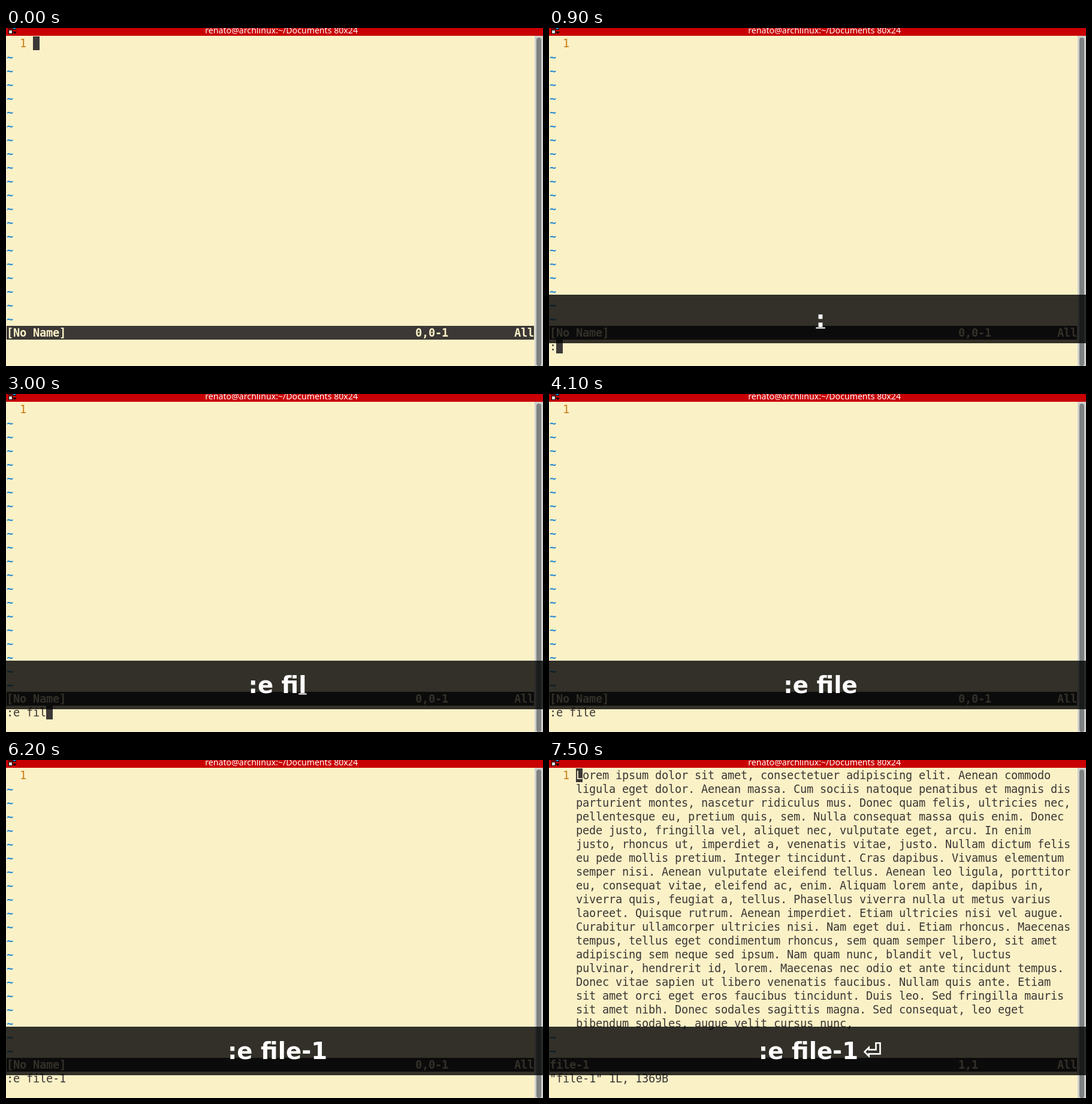
Animation of 896x564 px, one loop 8000 ms. Source, as an HTML page:

```html
<!DOCTYPE html>
<html lang="en">
<head>
<meta charset="utf-8">
<title>Opening a file</title>
<style>
html, body { margin: 0; width: 100%; height: 100%; overflow: hidden; background: #fbf1c7; }
svg { display: block; width: 100vw; height: 100vh; }
.cell { font: 18.667px "DejaVu Sans Mono", monospace; fill: #3c3836; }
.bold { font-weight: bold; }
.status { fill: #fbf1c7; }
.number { fill: #c77d16; }
.tilde { fill: #268bd2; }
.title { font: 14.15px "Noto Sans", sans-serif; fill: #fff; text-anchor: end; }
.keys { font: bold 38.667px "DejaVu Sans", sans-serif; fill: #fff; text-anchor: middle; }
</style>
</head>
<body>
<svg viewBox="0 0 896 564">
  <rect width="896" height="564" fill="#fbf1c7"/>
  <rect width="896" height="13" fill="#c80003"/>
  <g stroke="#000" stroke-width="1">
    <rect x="4.5" y="-3.5" width="5" height="5" fill="#c80003"/>
    <rect x="11.5" y="-3.5" width="5" height="6" fill="#2a8fd0"/>
    <rect x="4.5" y="3.5" width="6" height="6" fill="#e2dfdf"/>
  </g>
  <path d="M11 6h7l-3.5 4z"/>
  <text class="title" x="587" y="9">renato@archlinux:~/Documents 80x24</text>
  <rect x="882" y="13" width="14" height="551" fill="#cfcfcd"/>
  <rect x="885" y="16" width="8" height="548" rx="4" fill="#7e8182"/>
  <rect x="1" y="497" width="880" height="23" fill="#3c3836"/>
  <g id="grid"></g>
  <rect id="cursor" width="11" height="23" fill="#3c3836"/>
  <g id="top"></g>
  <g id="overlay">
    <rect y="445" width="896" height="81" opacity=".8"/>
    <text id="keys" class="keys" x="453" y="499"></text>
    <rect id="underline" y="499.5" height="2" fill="#fff"/>
  </g>
</svg>
<script>
const LOOP = 8000, BLINK = 600, START = 900, LOADED = 6300;
const COL = 11, ROW = 23, LEFT = 1, TOP = 14;

const body = `Lorem ipsum dolor sit amet, consectetuer adipiscing elit. Aenean commodo
ligula eget dolor. Aenean massa. Cum sociis natoque penatibus et magnis dis
parturient montes, nascetur ridiculus mus. Donec quam felis, ultricies nec,
pellentesque eu, pretium quis, sem. Nulla consequat massa quis enim. Donec
pede justo, fringilla vel, aliquet nec, vulputate eget, arcu. In enim
justo, rhoncus ut, imperdiet a, venenatis vitae, justo. Nullam dictum felis
eu pede mollis pretium. Integer tincidunt. Cras dapibus. Vivamus elementum
semper nisi. Aenean vulputate eleifend tellus. Aenean leo ligula, porttitor
eu, consequat vitae, eleifend ac, enim. Aliquam lorem ante, dapibus in,
viverra quis, feugiat a, tellus. Phasellus viverra nulla ut metus varius
laoreet. Quisque rutrum. Aenean imperdiet. Etiam ultricies nisi vel augue.
Curabitur ullamcorper ultricies nisi. Nam eget dui. Etiam rhoncus. Maecenas
tempus, tellus eget condimentum rhoncus, sem quam semper libero, sit amet
adipiscing sem neque sed ipsum. Nam quam nunc, blandit vel, luctus
pulvinar, hendrerit id, lorem. Maecenas nec odio et ante tincidunt tempus.
Donec vitae sapien ut libero venenatis faucibus. Nullam quis ante. Etiam
sit amet orci eget eros faucibus tincidunt. Duis leo. Sed fringilla mauris
sit amet nibh. Donec sodales sagittis magna. Sed consequat, leo eget
bibendum sodales, augue velit cursus nunc,`.split("\n");

// key, time pressed, delay until the terminal echoes it, underline duration
const presses = [
  [":", 900], ["e", 1400], [" ", 1800], ["f", 2200, 100], ["i", 2700, 0, 300],
  ["l", 3000], ["e", 3500], ["-", 4700, 100], ["1", 5600], ["\u2009\u23ce", LOADED]
].map(([key, at, lag = 0, hold = 200]) => ({ key, at, echo: at + lag, hold }));

const el = id => document.getElementById(id);
const show = (node, on) => node.setAttribute("display", on ? "inline" : "none");
const colX = col => LEFT + col * COL;
const rowY = row => TOP + row * ROW;

function make(name, parent) {
  return parent.appendChild(document.createElementNS("http://www.w3.org/2000/svg", name));
}

// Each character sits on the terminal's grid.
function put(node, text) {
  node.setAttribute("x", [...text].map((_, i) => colX(node.col + i)).join(" "));
  node.textContent = text;
}

function cellText(parent, row, col, text, style = "") {
  const node = make("text", parent);
  node.setAttribute("class", "cell " + style);
  node.setAttribute("y", rowY(row) + 18);
  node.col = col;
  put(node, text);
  return node;
}

const grid = el("grid"), cursor = el("cursor"), overlay = el("overlay");
const keys = el("keys"), underline = el("underline");
const empty = make("g", grid), page = make("g", grid);

cellText(grid, 0, 2, "1", "number");
for (let row = 1; row <= 20; row++) {
  cellText(row < body.length ? empty : grid, row, 0, "~", "bold tilde");
}
body.forEach((line, row) => cellText(page, row, 4, line));
const fileName = cellText(grid, 21, 0, "", "bold status");
const position = cellText(grid, 21, 62, "", "bold status");
cellText(grid, 21, 77, "All", "bold status");
const command = cellText(grid, 22, 0, "");
const covered = cellText(el("top"), 0, 4, "L", "status");

function drawOverlay(t) {
  const pressed = presses.filter(p => p.at <= t);
  const last = pressed[pressed.length - 1];
  show(overlay, !!last);
  if (!last) return;
  keys.textContent = pressed.map(p => p.key).join("").replace(/ /g, "\u00a0");
  const marked = t < last.at + last.hold;
  show(underline, marked);
  if (marked) {
    const n = keys.getNumberOfChars() - 1;
    const x = keys.getStartPositionOfChar(n).x;
    underline.setAttribute("x", x);
    underline.setAttribute("width", keys.getEndPositionOfChar(n).x - x);
  }
}

function drawTerminal(t) {
  const loaded = t >= LOADED;
  const echoed = presses.filter(p => p.echo <= t);
  const typed = echoed.map(p => p.key).join("");
  show(page, loaded);
  show(empty, !loaded);
  put(fileName, loaded ? "file-1" : "[No Name]");
  put(position, loaded ? "1,1" : "0,0-1");
  put(command, loaded ? '"file-1" 1L, 1369B' : typed);

  const typing = t >= START && !loaded;
  const lit = t < START
    ? t < 100 || t >= 600
    : Math.floor((t - echoed[echoed.length - 1].echo) / BLINK) % 2 === 0;
  cursor.setAttribute("x", colX(typing ? typed.length : 4));
  cursor.setAttribute("y", rowY(typing ? 22 : 0));
  show(cursor, lit);
  show(covered, lit && loaded);
}

function draw(t) {
  drawTerminal(t);
  drawOverlay(t);
}

const begin = performance.now();
function tick() {
  draw((performance.now() - begin) % LOOP);
  requestAnimationFrame(tick);
}
draw(0);
requestAnimationFrame(tick);
</script>
</body>
</html>
```
